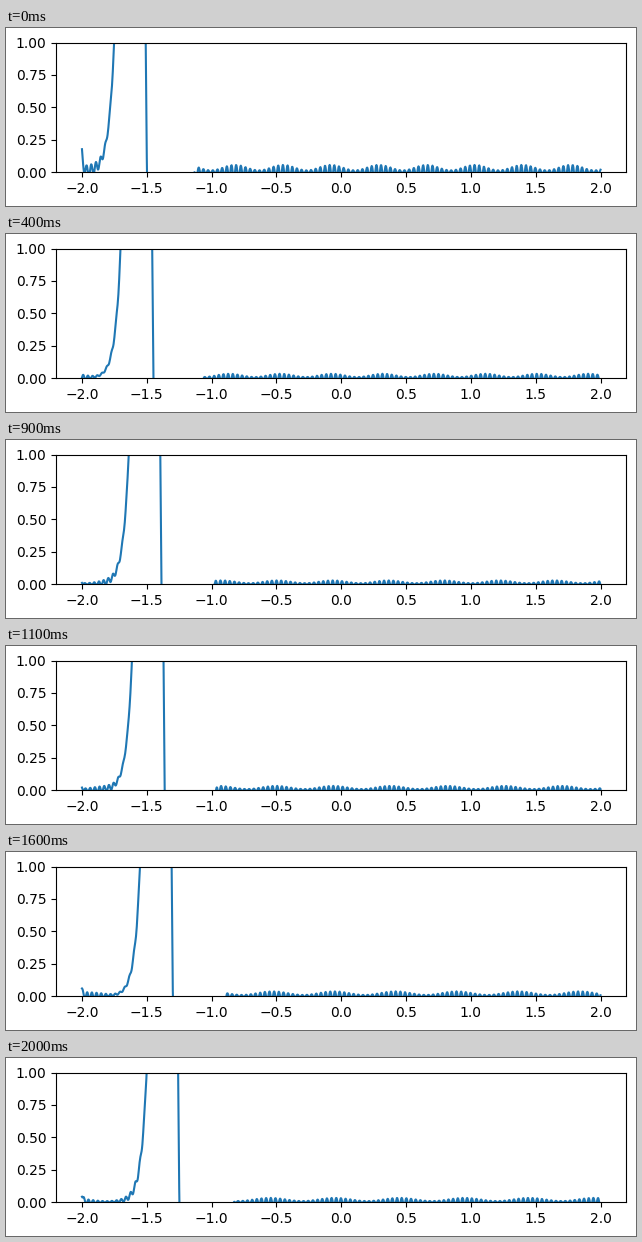
These frames come from a looping animation (630 px wide and 178 px high, 2.1 s). A matplotlib script:

```python
import numpy as np
import matplotlib.pyplot as plt
from matplotlib.animation import FuncAnimation

W, H, DPI = 630, 178, 100
FRAMES, INTERVAL = 21, 100
SPEED = 0.0125                     # pulse travel per frame
PERIOD, DRIFT = 0.03606, 0.00255   # ripple wavelength, travel per frame

x = np.linspace(-2, 2, 1297)


def ripple(i):
    """Short waves in groups that spread out as time passes."""
    size = np.interp(i, [0, 6, 14, 20], [0.055, 0.022, 0.038, 0.032])
    group = np.cos(2 * np.pi * (x + 0.45 + 0.005 * i) / (0.37 + 0.0065 * i))
    short = np.cos(2 * np.pi * (x + 1.9645 - DRIFT * i) / PERIOD)
    return size * (0.62 + 0.38 * group) * short


def edge(i):
    """Spike at the left boundary: fades at once, slowly builds up again."""
    return (0.14 * np.exp(-i) + 0.00015 * i**2) * np.exp(-(x + 2) / 0.01)


def wave(i):
    crest = -1.752 + SPEED * i
    front = -1.499 + SPEED * i
    calm_end = -1.119 + 0.0147 * i
    r = ripple(i)
    rise = np.exp(np.minimum((x - crest) / 0.0425, 3)) + 0.8 * r + edge(i)
    pulse = np.minimum(rise, (front - x) / 0.0093)
    calm = np.clip((calm_end - x) / 0.045, 0, 1)
    rest = r * (1 - calm) - 0.1 * calm
    return np.where(x < front, pulse, rest)


fig = plt.figure(figsize=(W / DPI, H / DPI), dpi=DPI, facecolor="white")
ax = fig.add_axes([50.05 / W, 34 / H, 570.4 / W, 129.36 / H])
ax.set_xlim(-2.2, 2.2)
ax.set_ylim(0, 1)
ax.set_xticks(np.arange(-2, 2.1, 0.5))
ax.set_yticks(np.arange(0, 1.1, 0.25))
line, = ax.plot(x, wave(0), color="C0", lw=1.5)


def update(i):
    line.set_ydata(wave(i))
    return line,


anim = FuncAnimation(fig, update, frames=FRAMES, interval=INTERVAL,
                     repeat=True, repeat_delay=0)
plt.show()
```
